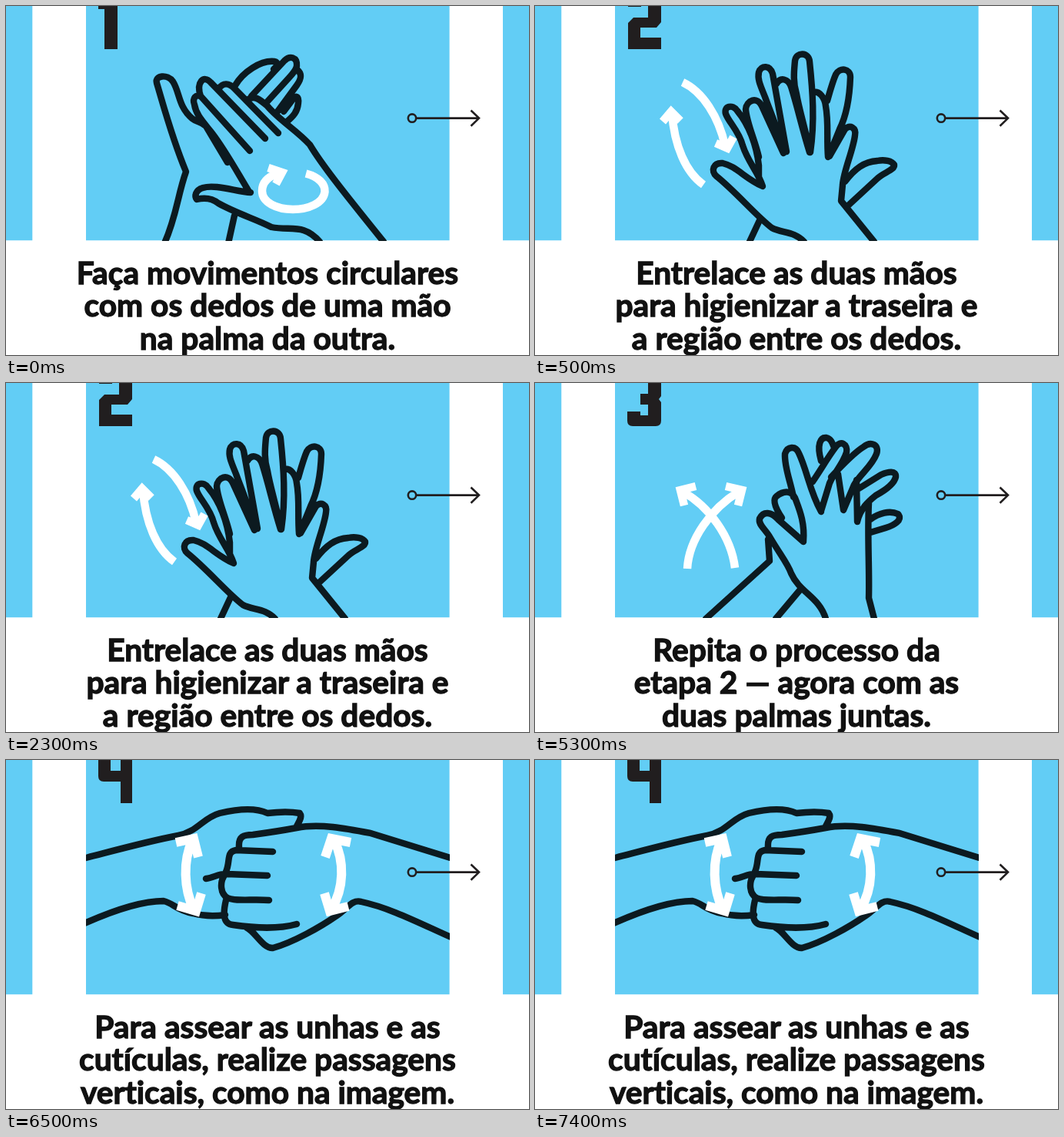
An HTML page for the animation above (8000 ms loop, 680 by 453 pixels).

```html
<!DOCTYPE html>
<html lang="pt">
<head>
<meta charset="utf-8">
<title>Lavar as mãos</title>
<style>
  html, body { margin: 0; height: 100%; overflow: hidden; background: #fff; }
  svg { display: block; width: 100vw; height: 100vh; }
  .blue { fill: #62cdf5; }
  .digit { fill: #211e1f; }
  .hand { fill: none; stroke: #0c1a20; stroke-width: 8.4; stroke-linecap: round; stroke-linejoin: round; }
  .move { fill: none; stroke: #fff; }
  .next { fill: none; stroke: #211e1f; stroke-width: 2.6; }
  text {
    font: 700 40.7px Lato, "Open Sans", sans-serif;
    font-variant-ligatures: none;
    text-anchor: middle; fill: #111; stroke: #111; stroke-width: 1.3;
  }
</style>
</head>
<body>
<svg viewBox="0 0 680 453">
  <clipPath id="panel"><path d="M104 0H576.600V304.300H104z"/></clipPath>
  <path class="blue" d="M0 0H34.300V304.300H0zM104 0H576.600V304.300H104zM646 0H680V304.300H646z"/>
  <g id="scenes"></g>
  <g class="next">
    <circle cx="528" cy="145.6" r="5.2"/>
    <path d="M533 145.6H615M604.5 135.5L615 145.6L604.5 155.7"/>
  </g>
</svg>
<script>
const LOOP = 8000;

const scenes = [
  {
    from: 0, to: 500, weight: 10.5,
    lines: ['Faça movimentos circulares', 'com os dedos de uma mão', 'na palma da outra.'],
    digit: 'M120 0H145V56H128V4H120z',
    hand: `M206 308C222 272 223 246 234 215C216 172 205 130 196 100C193 90 210 88 217 98
      C226 112 224 131 242 146C248 151 254 150 260 156L288 203
      M317 188L254 118C247 113 242 120 245 128C247 141 256 150 268 165C285 187 299 213 316 241
      M337 172L266 99C257 89 247 99 253 117
      M354 165L297 107C290 100 282 99 277 107
      M314 122C322 115 330 121 340 130C355 148 379 162 395 180C410 205 436 238 491 306
      M298 103C308 86 331 70 349 72C355 73 353 78 348 82
      M319 117L362 71C369 64 379 66 378 78C377 84 373 87 369 92L338 126
      M379 83C386 89 383 96 378 103L353 137
      M361 137L373 121C378 115 381 118 380 126C379 137 374 143 364 151
      M318 242C300 241 272 231 256 236C246 239 245 247 248 251C256 249 266 248 276 256
      C299 269 326 277 345 287C371 292 387 282 408 306M297 272L289 308`,
    move: `M390 217.500C407 222 415 231 414.500 241C413 256 393 264 373 264
      C352 264 333 255 333 240C333 228 342 221 354 217M341 210L359 216L351 231`
  },
  {
    from: 500, to: 3500, weight: 10.5,
    lines: ['Entrelace as duas mãos', 'para higienizar a traseira e', 'a região entre os dedos.'],
    digit: 'M121 0H138V1H121zM147 0H164V21L158 28H137V41H164V56H121V22L128 15H147z',
    hand: `M350 306C337 292 321 295 308 288C288 273 261 241 236 221C228 214 232 203 244 204
      C262 208 273 224 296 234C290 215 277 203 270 181C265 162 252 151 248 140
      C245 130 257 127 263 136C278 154 288 180 291 207V222
      M291 196C286 174 275 151 274 134C275 122 289 117 295 130L323 191
      C318 163 306 138 299 118C293 103 289 95 291 86C294 76 306 77 309 88L327 189
      M314 101C319 92 329 94 333 105C341 130 347 158 357 190
      C353 163 344 138 340 114C335 98 337 83 338 71C340 59 356 60 357 72C361 110 364 149 358 190
      M361 112C370 109 377 120 378 130C382 151 379 172 381 196
      M380 123C384 109 387 98 391 89C396 79 410 81 410 92C409 121 404 144 396 160L383 192
      M383 195L403 160C409 153 418 158 416 168C414 186 401 215 400 232L398 253L441 306
      M403 228C416 211 428 202 445 201C454 199 464 201 467 206C468 213 453 216 445 224L406 260
      M293 276L278 308`,
    move: `M192 99C218 111 239 144 247 181M235 178L250 184.500L258 170
      M219 232C196 216 181 181 178 138M166 150L177 137L189 149`
  },
  {
    from: 3500, to: 6500, weight: 10.5,
    lines: ['Repita o processo da', 'etapa 2 — agora com as', 'duas palmas juntas.'],
    digit: 'M147 0H164V17L161 21L164 25V49Q164 56 157 56H127Q120 56 120 49V37H137V42H147V28H137V14H147z',
    hand: `M222 306L305 231L303 203
      M349 206L316 177C307 167 297 166 292 176C290 184 299 189 306 201C319 223 329 235 333 247
      C344 272 370 278 378 306M345 268L313 306
      M321 175C311 160 309 151 314 147C324 139 334 140 338 149C344 165 351 181 349 206
      M336 148C332 127 324 109 325 92C328 82 339 81 343 91C354 114 357 140 372 167
      M372 101C366 80 371 70 379 71C384 72 386 76 389 84
      M361 128C372 112 381 96 391 83C397 74 407 79 405 90C400 106 389 116 383 130L372 166
      M385 122C399 107 414 91 427 83C437 75 448 80 444 92C438 108 423 118 415 132L401 165L394 118
      M418 126L419 180C423 163 433 154 443 146C454 140 467 131 469 122C470 113 459 115 450 119L421 137
      M436 177C447 169 461 165 472 170C479 178 466 185 456 188L436 194
      M434 156C432 199 435 240 434 279L441 306`,
    move: `M198 241C200 203 229 163 265 141M248 134L269 139L264 159
      M260 240C255 199 226 160 192 141M209 134L189 139L194 159`
  },
  {
    from: 6500, to: LOOP, weight: 12,
    lines: ['Para assear as unhas e as', 'cutículas, realize passagens', 'verticais, como na imagem.'],
    digit: 'M120 0H136V14H149V0H164V56H149V28H127Q120 28 120 21z',
    hand: `M100 128C143 117 182 106 224 98C249 93 256 75 278 69C299 64 323 61 340 69C356 67 371 67 382 69
      C386 74 380 81 377 88
      M303 113C302 99 309 97 321 97C343 94 362 91 378 88C407 82 443 89 474 95L581 128
      M347 119L299 117C286 119 292 132 286 145
      M260 154C270 153 277 147 287 148L340 150
      M285 148C277 159 279 174 288 179C299 184 321 180 342 182
      M286 182C282 199 282 213 295 214C316 217 349 221 378 213
      M100 213C131 199 171 183 205 183C218 186 221 195 243 199C258 203 272 203 285 201
      M312 217C324 222 334 245 347 244C373 237 410 216 430 202C442 195 450 180 462 184
      C500 192 540 213 581 231`,
    move: `M242 105C230 131 231 166 244 194M221 107L244 102L250 126M223 189L247 196L254 173
      M427 105C440 131 440 166 423 194M415 126L423 102L448 107M414 173L421 196L445 190`
  }
];

const draw = ({ lines, digit, hand, move, weight }) => `
  <g clip-path="url(#panel)">
    <path class="digit" d="${digit}"/>
    <path class="hand" d="${hand}"/>
    <path class="move" stroke-width="${weight}" d="${move}"/>
  </g>
  ${lines.map((line, i) => `<text x="340" y="${360.6 + i * 42.6}">${line}</text>`).join('')}`;

const root = document.getElementById('scenes');
root.innerHTML = scenes.map(s => `<g>${draw(s)}</g>`).join('');

scenes.forEach(({ from, to }, i) => {
  const steps = [0, from, to, LOOP].map(time => ({
    offset: time / LOOP,
    opacity: time >= from && time < to ? 1 : 0,
    easing: 'step-end'
  }));
  root.children[i].animate(steps, { duration: LOOP, iterations: Infinity, fill: 'both' });
});
</script>
</body>
</html>
```
